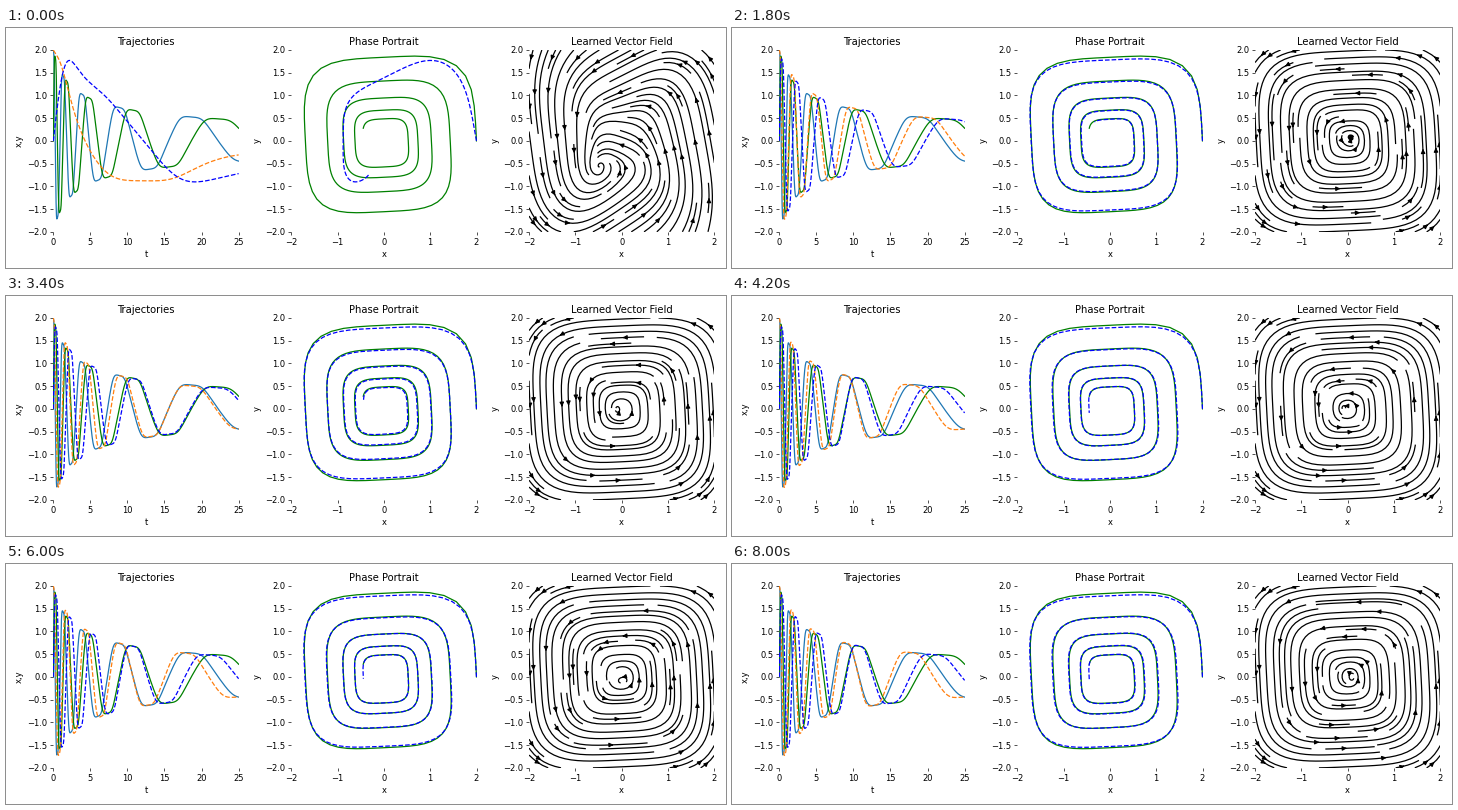
Write a matplotlib script that moves like this. It is 720 px wide and 240 px high and loops after 8200 ms.

```python
import numpy as np
import matplotlib.pyplot as plt
from matplotlib.animation import FuncAnimation

FRAMES, INTERVAL = 41, 200
t = np.linspace(0, 25, 1000)


def true_field(x, y):
    return -0.1 * x**3 - 2 * y**3, 2 * x**3 - 0.1 * y**3


def early_field(x, y):
    """Barely trained model: a slow, saturating spiral off the origin."""
    u, v = x**3, y**3
    u, v = u / (1 + 0.1 * abs(u)), v / (1 + 0.1 * abs(v))
    return -0.033 - 0.15 * v - 0.05 * u, 0.012 + 0.33 * u - 0.09 * v


def late_field(x, y, k_in, k_out, damp, cx, cy):
    """Cubic spiral around (cx, cy) that runs too slowly far from the centre."""
    q = x**4 + y**4
    w = q / (q + 4)
    k = k_in + (k_out - k_in) * w
    u, v = x**3 - cx**3, y**3 - cy**3
    return k * (-damp * u - 2 * (1 + 0.2 * w) * v), k * (2 * u - damp * v)


def model_field(x, y, mix, *params):
    ax, ay = early_field(x, y)
    bx, by = late_field(x, y, *params)
    return ax + mix * (bx - ax), ay + mix * (by - ay)


def integrate(field, start):
    """Classic RK4 over t; start may hold many runs at once."""
    h = t[1] - t[0]
    f = lambda s: np.array(field(*s))
    path = [np.array(start, float)]
    for _ in t[1:]:
        s = path[-1]
        a = f(s)
        b = f(s + h / 2 * a)
        c = f(s + h / 2 * b)
        d = f(s + h * c)
        path.append(s + h / 6 * (a + 2 * b + 2 * c + d))
    return np.array(path)


# Model state over training: k_in, k_out, damping, centre x, centre y
steps = np.arange(FRAMES)
keys = [9, 13, 21, 26, 35, 40]
stages = np.array([
    [1.04, 0.53, 0.103, 0.10, 0.10],
    [1.10, 0.50, 0.107, -0.06, -0.10],
    [1.13, 0.55, 0.101, -0.05, 0.03],
    [1.19, 0.50, 0.098, 0.02, -0.10],
    [1.10, 0.52, 0.105, 0.10, 0.06],
    [1.12, 0.53, 0.1005, 0.10, -0.02],
])
params = np.array([np.interp(steps, keys, col) for col in stages.T])
noise = np.random.default_rng(4).normal(size=params.shape)
noise[:, keys] = 0
params += noise * np.array([[0.02], [0.008], [0.001], [0.03], [0.03]])
mix = 1 - (1 - np.minimum(steps / 7, 1)) ** 2

true_x, true_y = integrate(true_field, [2, 0]).T
runs = integrate(lambda x, y: model_field(x, y, mix, *params),
                 [np.full(FRAMES, 2.0), np.zeros(FRAMES)])

fig = plt.figure(figsize=(12, 4), dpi=60, facecolor="white")
ax_traj, ax_phase, ax_vec = (fig.add_subplot(1, 3, n, frameon=False)
                             for n in (1, 2, 3))


def setup(ax, title, xlabel, ylabel, xlim):
    ax.set(title=title, xlabel=xlabel, ylabel=ylabel, xlim=xlim, ylim=(-2, 2))


setup(ax_traj, "Trajectories", "t", "x,y", (0, 25))
setup(ax_phase, "Phase Portrait", "x", "y", (-2, 2))
setup(ax_vec, "Learned Vector Field", "x", "y", (-2, 2))
fig.tight_layout()

ax_traj.plot(t, true_x, "C0-", t, true_y, "g-")
line_x, line_y = ax_traj.plot(t, t * 0, "C1--", t, t * 0, "b--")
ax_phase.plot(true_x, true_y, "g-")
line_xy, = ax_phase.plot([], [], "b--")

grid_y, grid_x = np.mgrid[-2:2:21j, -2:2:21j]


def draw(i):
    x, y = runs[:, 0, i], runs[:, 1, i]
    line_x.set_ydata(x)
    line_y.set_ydata(y)
    line_xy.set_data(x, y)

    for artist in [*ax_vec.collections, *ax_vec.patches]:
        artist.remove()
    dx, dy = model_field(grid_x, grid_y, mix[i], *params[:, i])
    mag = np.hypot(dx, dy) + 1e-12
    ax_vec.streamplot(grid_x, grid_y, dx / mag, dy / mag, color="black")
    ax_vec.set(xlim=(-2, 2), ylim=(-2, 2))
    return []


anim = FuncAnimation(fig, draw, frames=FRAMES, interval=INTERVAL,
                     init_func=lambda: [], repeat=True, repeat_delay=0)
plt.show()
```
